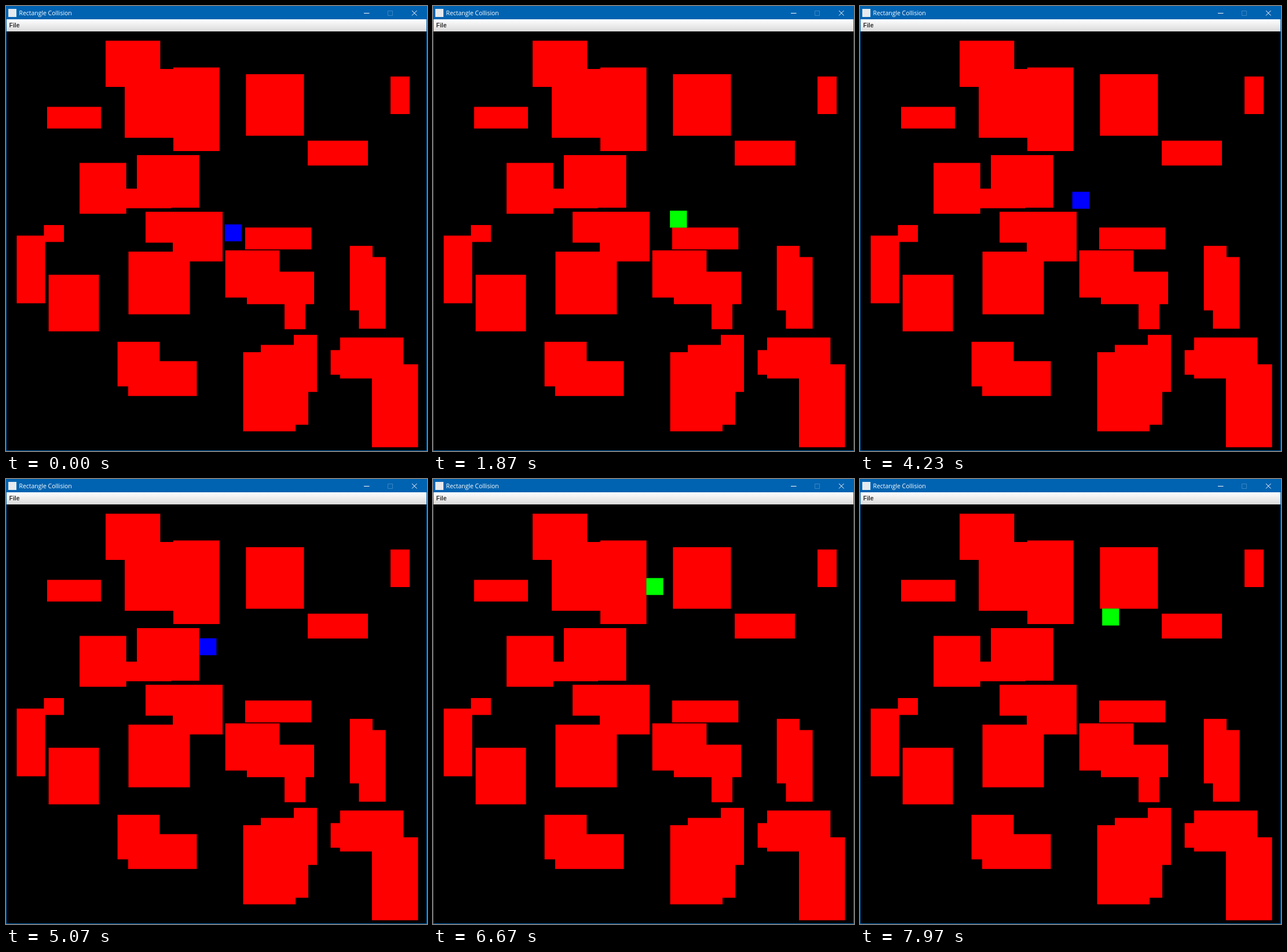
An HTML page for the animation above (8000 ms loop, 727 by 770 pixels).

```html
<!DOCTYPE html>
<html lang="en">
<head>
<meta charset="utf-8">
<title>Rectangle Collision</title>
<style>
  html, body { margin: 0; width: 100%; height: 100%; overflow: hidden; background: #000; }
  svg { display: block; width: 727px; height: 770px; }
  .title { font: 10.45px "Open Sans", sans-serif; fill: #fff; }
  .menu { font: bold 10.4px "Liberation Sans", Arial, sans-serif; fill: #333; }
  .button { fill: none; stroke: #fff; }
  .disabled { stroke: #3b86c3; }
</style>
</head>
<body>
<svg viewBox="0 0 727 770">
  <defs>
    <linearGradient id="bar" x2="0" y2="1">
      <stop offset="0" stop-color="#fff"/>
      <stop offset="1" stop-color="#dadada"/>
    </linearGradient>
  </defs>
  <rect width="727" height="770" fill="#0063b1"/>
  <rect x="1" y="44" width="725" height="725" fill="#000"/>
  <rect x="4" y="5" width="14" height="14" fill="#e6e9ee"/>
  <text class="title" x="22.5" y="15.7">Rectangle Collision</text>
  <path class="button" d="M618 12.5h9.5"/>
  <path class="button disabled" d="M659.5 8.5h8v8h-8z"/>
  <path class="button" d="M701 8l8.5 8.5M709.5 8L701 16.5"/>
  <rect x="1" y="23" width="725" height="21" fill="url(#bar)"/>
  <text class="menu" x="5.6" y="37">File</text>
  <g id="walls" fill="#f00"></g>
  <rect id="player" width="29.3" height="29.3"/>
</svg>
<script>
  const SIZE = 29.3, TICKS_PER_MS = 0.03, LOOP = 8000;

  // left, top, right, bottom
  const walls = [
    [172, 60, 266.3, 140], [205, 109, 300, 228], [289, 106.4, 368.6, 251],
    [71, 174.5, 164, 212], [414.4, 118, 514.5, 224.5], [664, 122, 697, 187],
    [521, 233, 625, 276], [127, 271.5, 207.6, 359.5], [226, 258, 333.6, 349],
    [200, 316, 285, 350], [241, 356, 340, 409.5], [288, 356, 374.1, 442],
    [211.5, 425, 317.5, 533.5], [65.5, 379, 100, 408.3], [18.5, 397.3, 67.6, 514.4],
    [73.6, 465, 160.5, 563], [413, 383.3, 527.3, 421.2], [378.7, 422.8, 472.4, 504.5],
    [416, 459.7, 532, 516], [481, 500, 517, 559.3], [593.7, 415, 633, 526.7],
    [609.5, 434.4, 655.6, 558.4], [192.6, 581, 265.4, 658.2], [211, 614.5, 329.5, 674.8],
    [409.6, 599, 500, 736], [440, 586.4, 522, 724.6], [497, 569, 537, 667.8],
    [560.6, 595.4, 600, 638], [577, 573.6, 686.3, 644.5], [632, 620, 711.5, 763.5]
  ];

  // tick, x, y: straight runs between key presses
  const route = [
    [18, 377.9, 377.9], [26, 377.9, 354], [38, 400.5, 331.5], [40, 400.5, 331.5],
    [44, 413.6, 331.5], [48, 413.6, 331.5], [54, 413.6, 349.5], [56, 409.2, 354.2],
    [64, 386.4, 354.2], [73, 386.4, 354.2], [75, 380, 354.2], [79, 373.7, 361],
    [82, 373.7, 361], [93, 373.7, 394.3], [102, 373.7, 394.3], [103, 373.7, 391.8],
    [123, 373.7, 327], [127, 366.6, 321.5], [129, 361, 321.5], [145, 334.1, 291],
    [152, 334.1, 275.6], [177, 380.4, 229.3], [179, 383.2, 223.5], [183, 383.2, 211.2],
    [184, 385.3, 209], [187, 385.3, 199.5], [195, 368.4, 181.5], [199, 368.4, 169.7],
    [200, 368.4, 171.4], [202, 368.4, 178.1], [206, 368.4, 191.3], [213, 385.3, 208.3],
    [218, 385.3, 222.6], [229, 385.3, 222.6], [231, 386.5, 228], [232, 390.5, 231.4],
    [236, 406, 231.4], [239, 418.2, 224.2]
  ];

  const setAttributes = (node, values) => {
    for (const name in values) node.setAttribute(name, values[name]);
  };

  const wallGroup = document.getElementById("walls");
  const player = document.getElementById("player");

  for (const [left, top, right, bottom] of walls) {
    const rect = document.createElementNS(wallGroup.namespaceURI, "rect");
    setAttributes(rect, { x: left, y: top, width: right - left, height: bottom - top });
    wallGroup.append(rect);
  }

  function positionAt(tick) {
    const next = route.findIndex(([time]) => time > tick);
    if (next === 0) return route[0].slice(1);
    if (next < 0) return route[route.length - 1].slice(1);
    const [t0, x0, y0] = route[next - 1];
    const [t1, x1, y1] = route[next];
    const part = (tick - t0) / (t1 - t0);
    return [x0 + (x1 - x0) * part, y0 + (y1 - y0) * part];
  }

  const collides = (x, y) => walls.some(([left, top, right, bottom]) =>
    x < right && x + SIZE > left && y < bottom && y + SIZE > top);

  const start = performance.now();

  function draw() {
    const time = (performance.now() - start) % LOOP;
    const [x, y] = positionAt(Math.floor((time + 4) * TICKS_PER_MS));
    setAttributes(player, { x, y, fill: collides(x, y) ? "#0f0" : "#00f" });
    requestAnimationFrame(draw);
  }
  draw();
</script>
</body>
</html>
```
